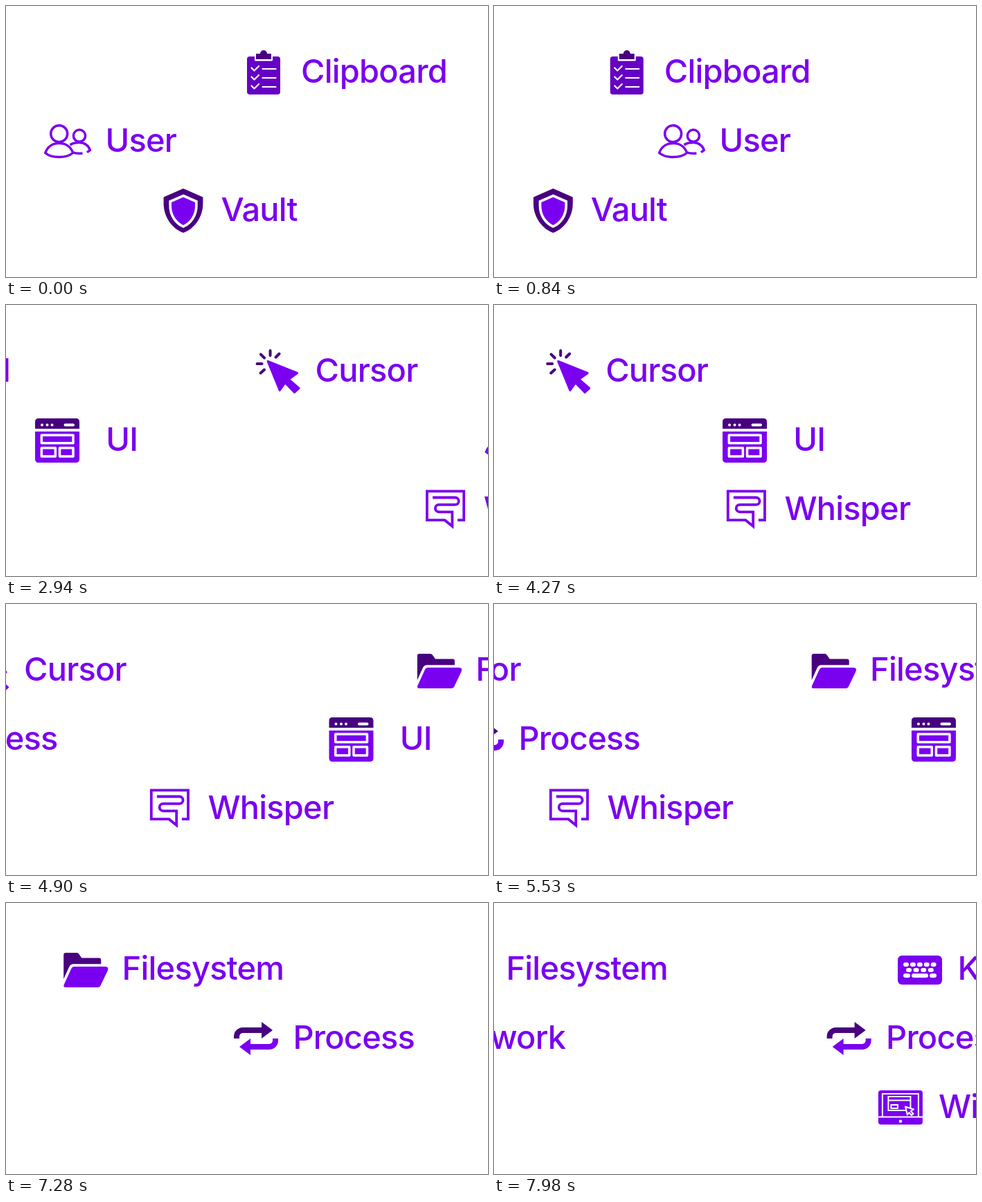
Write an HTML page that moves like this. It is 696 px wide and 392 px high and loops after 8 s.

```html
<!DOCTYPE html>
<html lang="en">
<head>
<meta charset="utf-8">
<title>Drifting labels</title>
<style>
  html, body { margin: 0; width: 100%; height: 100%; overflow: hidden; background: #fff; }
  svg { display: block; width: 100%; height: 100%; }
  text { font: 500 47px Inter, "Open Sans", sans-serif; letter-spacing: -.8px; }
  .main, text { fill: #7a00f0; }
  .mid { fill: #6600c4; }
  .dark { fill: #480080; }
  .white { fill: #fff; }
  .line { fill: none; stroke: #7a00f0; stroke-width: 3.5; }
  .dark-line { fill: none; stroke: #480080; }
  .white-line { fill: none; stroke: #fff; }
  .round { stroke-linecap: round; stroke-linejoin: round; }
</style>
</head>
<body>
<svg id="stage" viewBox="0 0 696 392"></svg>
<script>
const LOOP = 8000, STEP = 70;

// Each icon is drawn in a box 64 high, with its left edge at x = 0.
const icons = {
  clipboard: `
    <rect class="mid" y="9" width="48" height="55" rx="4"/>
    <rect class="white" x="11" y="7" width="26" height="8.5" rx="1"/>
    <path class="dark" d="M13 5H19A5 5 0 0 1 29 5H35V13H13Z"/>
    <path class="white-line round" stroke-width="2.2"
      d="M6.5 25.5l4 4 6.5-6.5M22.5 27H41.5M6.5 38.5l4 4 6.5-6.5M22.5 40H41.5M6.5 51.5l4 4 6.5-6.5M22.5 53H41.5"/>`,
  user: `
    <g class="line">
      <circle cx="21.7" cy="20.8" r="12"/>
      <circle cx="51" cy="23.7" r="8.6"/>
      <path d="M1.7 48.5C5 39 13 34.5 21.7 34.5S38.5 39 41.7 48.5C36 53 28 54.6 21.7 54.6S7 53 1.7 48.5Z"/>
      <path d="M37.5 37C41 34.5 46 33.6 51 33.6C59 33.6 65 38.5 66.3 44.6L62 47.7M41.7 47.7C45 49.3 50 49.5 55.5 49"/>
    </g>`,
  vault: `
    <path class="dark" d="M28 0L56.4 12.5V22C56.4 42 43 59 28 64C13 59 -.4 42 -.4 22V12.5Z"/>
    <path class="main" stroke="#fff" stroke-width="7.4" paint-order="stroke"
      d="M28 12.5L45 20V25C45 38 37.5 48.5 28 53C18.5 48.5 11 38 11 25V20Z"/>`,
  cursor: `
    <path class="main round" stroke="#7a00f0" stroke-width="3"
      d="M17.5 17.5L60 34.5L47.5 43.5L62.5 56.5L56 62.5L42.5 48.5L34.7 59.5Z"/>
    <path class="dark-line round" stroke-width="4"
      d="M21 2V9M34 6.5L29 11.5M7.3 7.3L12.5 12.5M2 21H9M12.5 29.5L7 34.5"/>`,
  ui: `
    <path class="dark" d="M0 15V5Q0 0 5 0H59Q64 0 64 5V15Z"/>
    <path class="main" d="M0 19H64V59Q64 64 59 64H5Q0 64 0 59Z"/>
    <path class="white-line round" stroke-width="4" d="M10 9.5h0M17.5 9.5h0M24.5 9.5h0M43.5 9.5H55"/>
    <path class="white-line" stroke-width="3.5" stroke-linejoin="round"
      d="M9.3 24.3H55V35.7H9.3ZM9.3 42.8H29.3V55H9.3ZM35.5 42.8H55V55H35.5Z"/>`,
  whisper: `
    <path class="line" style="stroke-width:3.8"
      d="M10 14.5H42.5a5.2 5.2 0 0 1 0 10.4H19a5.2 5.2 0 0 0 0 10.4H38.3V56L27.5 47.2H1.9V5.3H55.1V47.2H46"/>`,
  folder: `
    <path class="dark" d="M0 46V11Q0 8 3 8H19Q21 8 22 9.7L26 15.5H51Q54 15.5 54 18.5V24.3H14Q10 24.3 8 28.3Z"/>
    <path class="main" d="M15 28H60Q66 28 63.5 34L53 56Q51.8 58 49.5 58H3Q-1 58 .5 54L11 31Q12.3 28 15 28Z"/>`,
  process: `
    <g class="dark"><path class="dark-line" stroke-width="8" d="M4 32V29a9 9 0 0 1 9-9H41"/><path d="M40 8L56 20L40 32Z"/></g>
    <g class="main" transform="rotate(180 32 32)"><path class="line" style="stroke-width:8" d="M4 32V29a9 9 0 0 1 9-9H41"/><path d="M40 8L56 20L40 32Z"/></g>`,
  keyboard: `
    <rect class="main" y="12" width="64" height="42" rx="6"/>
    <g class="white-line round" stroke-width="6">
      <path stroke-dasharray="2 7.9" d="M11 25H53"/>
      <path stroke-dasharray="2 8.6" d="M15 33H50"/>
      <path d="M11 41H15M23 41H41M49 41H53"/>
    </g>`,
  window: `
    <rect class="main" y="7" width="64" height="49.5" rx="4"/>
    <path class="white-line" stroke-width="2" d="M0 45.5H64M6 45V12H58V45M14.5 16H46.5V36H14.5ZM14.5 21.5H46.5M18.5 28H28V33H18.5Z"/>
    <path class="main round" stroke="#fff" stroke-width="2" d="M39 30.5L51 34.5L47 37L50.5 41L48 43L44.5 39L42 42.5Z"/>
    <circle class="white" cx="32" cy="51.7" r="2.3"/>`
};

// speed: pixels per step; items: [icon, label, start x, label offset, label anchor]
const rows = [
  { speed: -15.02, items: [
    ["clipboard", "Clipboard", 348, 78],
    ["cursor", "Cursor", 991.4, 86],
    ["folder", "Filesystem", 1645.3, 84.4],
    ["keyboard", "Keyboard", 2295.3, 86.4]] },
  { speed: 15.16, items: [
    ["user", "User", 55, 88.5],
    ["ui", "UI", -594.7, 102.3],
    ["process", "Process", -1247.6, 85.4],
    ["", "Network", -1900, 275, "end"]] },
  { speed: -14.22, items: [
    ["vault", "Vault", 228, 82.4],
    ["whisper", "Whisper", 1203.3, 83.6],
    ["window", "Window", 2176, 87]] }
];

const drawItem = ([icon, label, x, offset, anchor = "start"]) =>
  `<g transform="translate(${x})">${icons[icon] || ""}<text x="${offset}" y="46.5" text-anchor="${anchor}">${label}</text></g>`;

const stage = document.getElementById("stage");
stage.innerHTML = rows.map(row => `<g>${row.items.map(drawItem).join("")}</g>`).join("");

function render() {
  const step = Math.floor(performance.now() % LOOP / STEP);
  rows.forEach((row, i) =>
    stage.children[i].setAttribute("transform", `translate(${row.speed * step} ${64 + 100 * i})`));
  requestAnimationFrame(render);
}
render();
</script>
</body>
</html>
```
